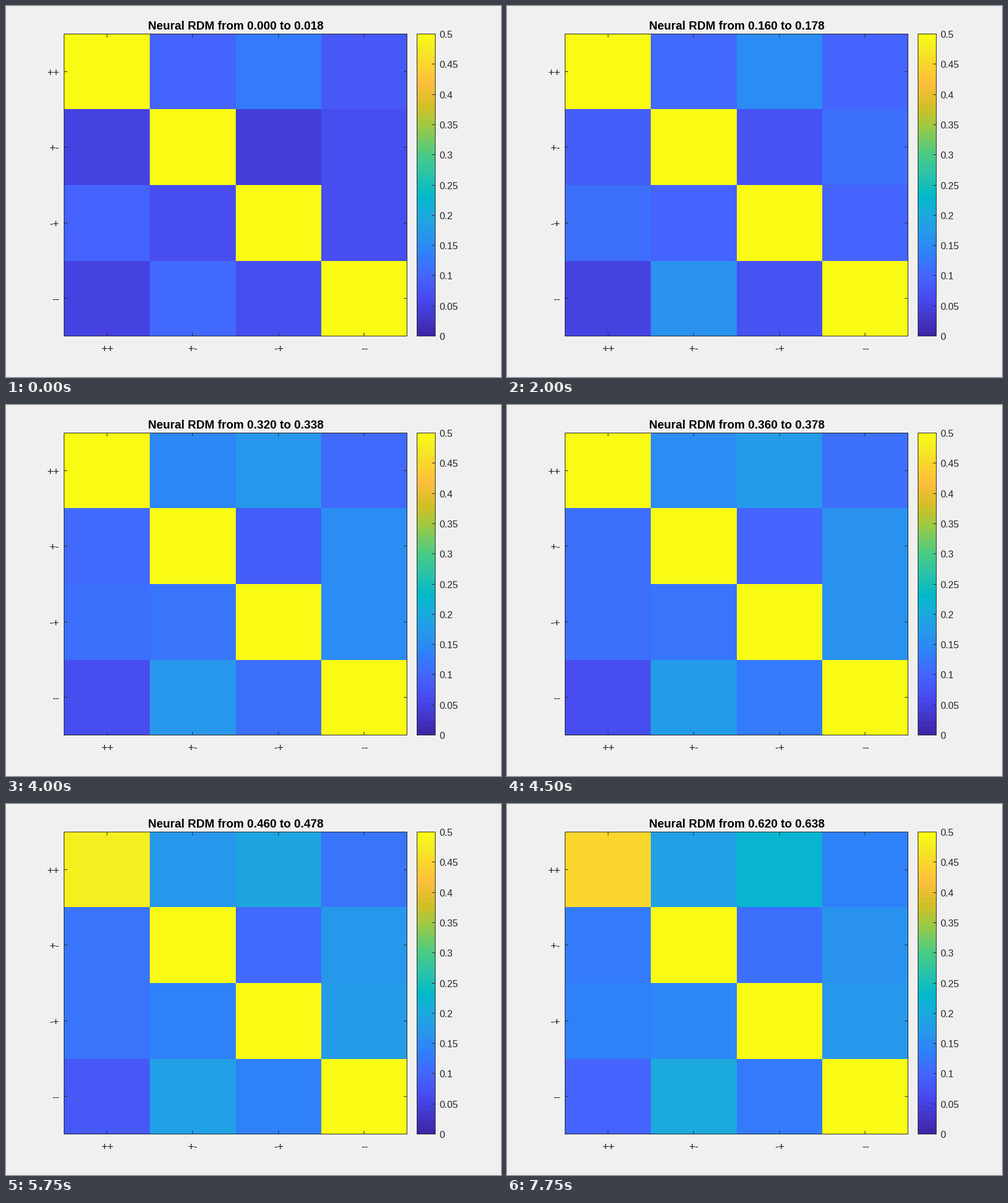
Animation, 840 px wide and 630 px high, one loop 8 s. Source, as a matplotlib script:

```python
import numpy as np
import matplotlib.pyplot as plt
from matplotlib.animation import FuncAnimation
from matplotlib.colors import LinearSegmentedColormap
from matplotlib.patches import Rectangle

W, H, DPI = 840, 630, 100
FRAMES, INTERVAL = 32, 250
PX = 72 / DPI
INK = "#262626"
TOP_LEVEL = 63
plt.rcParams["font.family"] = "Liberation Sans"

# Level and colour of the bends in the colour scale
STOPS = {0: "#3e26a8", 7: "#4747eb", 12: "#4563fd", 17: "#2f81fa",
         21: "#2797eb", 26: "#18addb", 29: "#01b8ca", 33: "#24c1ae",
         38: "#4acb84", 44: "#9dc943", 48: "#d1bf27", 53: "#febe3c",
         57: "#fad62d", 60: "#f5e924", 63: "#f9fb15"}
SCALE = LinearSegmentedColormap.from_list(
    "scale", [(k / TOP_LEVEL, c) for k, c in STOPS.items()], N=64)

# Dissimilarity levels at a few moments; the cells drift between them
KEYS = [0, 8, 20, 31]
MATRICES = np.array([
    [[63, 12, 16, 10], [6, 63, 5, 8], [12, 8, 63, 8], [6, 13, 8, 63]],
    [[63, 13, 19, 12], [11, 63, 9, 14], [14, 12, 63, 12], [6, 20, 9, 63]],
    [[63, 20, 22, 14], [14, 63, 12, 21], [14, 16, 63, 22], [9, 22, 17, 63]],
    [[57, 23, 28, 17], [16, 63, 14, 20], [17, 18, 63, 21], [12, 25, 16, 63]],
])


def matrix(i):
    k = min(np.searchsorted(KEYS, i, side="right"), len(KEYS) - 1)
    t = (i - KEYS[k - 1]) / (KEYS[k] - KEYS[k - 1])
    return np.round(MATRICES[k - 1] * (1 - t) + MATRICES[k] * t)


fig = plt.figure(figsize=(W / DPI, H / DPI), dpi=DPI, facecolor="#f0f0f0")
ax = fig.add_axes([0, 0, 1, 1])
ax.axis("off")


def mesh(x, y, levels):
    return ax.pcolormesh(x, y, levels, cmap=SCALE, vmin=-.5,
                         vmax=TOP_LEVEL + .5, antialiased=False)


def tick(x, y, dx, dy):
    ax.plot([x, x + dx], [y, y + dy], color=INK, lw=PX, snap=False,
            solid_capstyle="butt", zorder=3)


def box(left, top, right, bottom):
    ax.add_patch(Rectangle((left, top), right - left, bottom - top,
                           fill=False, ec=INK, lw=PX, snap=False, zorder=3))


def label(x, y, s, size, ha, color=INK, **kw):
    return ax.text(x, y, s, fontsize=size * PX, ha=ha, va="baseline",
                   color=color, **kw)


# Matrix
L, T, R, B = 98.5, 47.5, 680.5, 560.5
TICK = 5.5
cells = mesh([98, 244, 390, 535, 681], [47, 175, 304, 433, 561], matrix(0))
box(L, T, R, B)
for k, name in enumerate(("++", "+-", "-+", "--")):
    x = np.floor(L + (k + .5) * (R - L) / 4) + .5
    y = np.floor(T + (k + .5) * (B - T) / 4) + .5
    tick(x, T, 0, TICK)
    tick(x, B, 0, -TICK)
    tick(L, y, TICK, 0)
    tick(R, y, -TICK, 0)
    label(x + .5, 588, name, 18.5, "center")
    label(90.5, y + 7.5, name, 18.5, "right")

# Colour bar
mesh([697, 729], np.linspace(561, 47, 65), np.arange(64)[:, None])
box(697.5, T, 728.5, B)
for k in range(11):
    y = np.floor(B - k * (B - T) / 10) + .5
    tick(728.5, y, -TICK, 0)
    label(735.5, y + 6.5, f"{k * .05:.2g}", 16.5, "left")

title = label(390, 40, "", 19.85, "center", color="black", weight="bold")
ax.set_xlim(0, W)
ax.set_ylim(H, 0)


def update(i):
    start = i * .02
    cells.set_array(matrix(i))
    title.set_text(f"Neural RDM from {start:.3f} to {start + .018:.3f}")
    return cells, title


anim = FuncAnimation(fig, update, frames=FRAMES, interval=INTERVAL,
                     init_func=lambda: update(0), repeat=True, repeat_delay=0)
plt.show()
```
